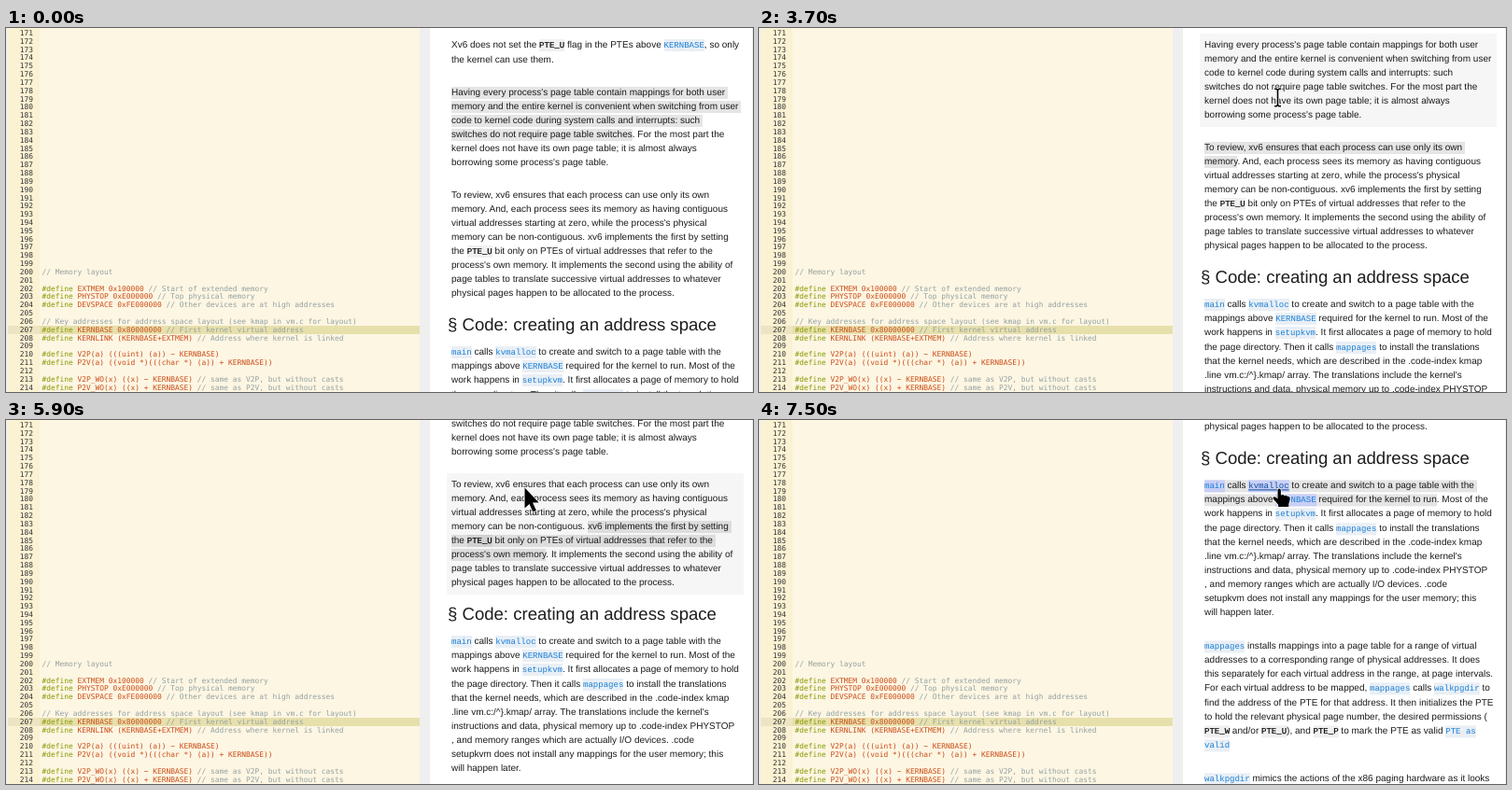
Recreate the animation shown at these times as an HTML page. Size 800 px wide and 390 px high, loop 8 s.

```html
<!DOCTYPE html>
<html lang="en">
<head>
<meta charset="utf-8">
<title>Code and commentary</title>
<style>
  html, body { margin: 0; width: 100%; height: 100%; overflow: hidden; background: #fff; }
  #stage { position: relative; width: 800px; height: 390px; overflow: hidden; background: #fff;
    text-rendering: geometricPrecision; font-kerning: none; font-variant-ligatures: none; }
  #stage div { position: absolute; white-space: pre; }

  #editor { left: 2px; top: 0; width: 441px; height: 390px; overflow: hidden; background: #fdf6e3;
    font: 7.9px/9px "DejaVu Sans Mono", monospace; color: #cb4b16; }
  #gutter { left: 0; top: 0; width: 34px; height: 390px; background: #fbf1d3; }
  #active { left: 0; width: 407px; height: 8.8px; background: #e7e0ac; border-left: 34px solid #ede5c1; }
  .num { left: 0; width: 27px; text-align: right; color: #333; }
  .code { left: 36.4px; }
  .code b { font-weight: 400; color: #859900; }
  .code i { font-style: normal; color: #93a1a1; }

  #split { left: 443px; top: 0; width: 11px; height: 390px; background: #efefef; }
  .edge { top: 0; height: 390px; background: #efefef; }

  #view { left: 454px; top: 0; width: 345px; height: 390px; overflow: hidden; }
  #doc { left: -454px; top: 0; color: #1c1c1c; font: 10.02px/15px "Liberation Sans", Arial, sans-serif; }
  #doc h2 { position: absolute; left: 473px; top: 305.5px; margin: 0; font: 400 18.57px/24px "Liberation Sans", Arial, sans-serif; }
  .para { left: 472px; width: 318px; }
  .para.hover { background: #f6f6f6; }
  .line { left: 5px; height: 15px; }
  mark { color: inherit; background: none; padding: 1px 0; }
  mark.on { background: rgba(0, 0, 0, .1); }
  code { font: 9.02px/0 "Liberation Mono", "Courier New", monospace; padding: 1px 0;
    color: #000; background: rgba(0, 0, 0, .06); -webkit-text-stroke: .2px; }
  code.link { color: #1a7fd6; background: #e9eff5; -webkit-text-stroke: 0; }
  mark.on code.link { background: #c9cff6; }
  code.link.over { color: #0b4f9c; text-decoration: underline; }

  #pointer { position: absolute; left: 0; top: 0; overflow: visible; }
  #pointer path { fill: #000; stroke: #fff; stroke-width: 1.4; paint-order: stroke; stroke-linejoin: round; }
</style>
</head>
<body>
<div id="stage">
  <div class="edge" style="left:0;width:2px"></div>
  <div id="editor"><div id="gutter"></div><div id="active"></div></div>
  <div id="split"></div>
  <div id="view"><div id="doc"><h2>§ Code: creating an address space</h2></div></div>
  <div class="edge" style="left:799px;width:1px"></div>
  <svg id="pointer" width="1" height="1">
    <path id="beam" d="M-3.5-10H-1L0-9L1-10H3.5V-8.4H1.5L.8-7.5V7.5L1.5 8.4H3.5V10H1L0 9L-1 10H-3.5V8.4H-1.5L-.8 7.5V-7.5L-1.5-8.4H-3.5Z"/>
    <path id="arrow" d="M0 0V22L5 17.4L8.8 26L12.4 24.4L8.6 16H15.2Z"/>
    <path id="hand" d="M0 1.5Q.2 0 1.6 0T3.4 1.5V7L5.8 6.6L7.2 7.4L9.2 7.2L10.4 8.2L12.2 8.6Q13.4 9.5 13.2 11.5L11.8 16.5V19.5H.6V17.2L-4.6 11.2Q-5.6 9.2-4 8.8Q-2 8.8 0 11Z"/>
  </svg>
</div>
<script>
const $ = id => document.getElementById(id);
const add = (parent, cls, html, top) => {
  const el = document.createElement('div');
  el.className = cls;
  el.innerHTML = html;
  el.style.top = top + 'px';
  return parent.appendChild(el);
};

// Editor
const FIRST = 171, LAST = 214, ROW = 8.826;
const rowTop = n => 1 + (n - FIRST) * ROW;
const source = {
  200: '// Memory layout',
  202: '#define EXTMEM 0x100000 // Start of extended memory',
  203: '#define PHYSTOP 0xE000000 // Top physical memory',
  204: '#define DEVSPACE 0xFE000000 // Other devices are at high addresses',
  206: '// Key addresses for address space layout (see kmap in vm.c for layout)',
  207: '#define KERNBASE 0x80000000 // First kernel virtual address',
  208: '#define KERNLINK (KERNBASE+EXTMEM) // Address where kernel is linked',
  210: '#define V2P(a) (((uint) (a)) − KERNBASE)',
  211: '#define P2V(a) ((void *)(((char *) (a)) + KERNBASE))',
  213: '#define V2P_WO(x) ((x) − KERNBASE) // same as V2P, but without casts',
  214: '#define P2V_WO(x) ((x) + KERNBASE) // same as P2V, but without casts'
};
$('active').style.top = rowTop(207) + 'px';
for (let n = FIRST; n <= LAST; n++) {
  add($('editor'), 'num', n, rowTop(n));
  if (source[n]) add($('editor'), 'code',
    source[n].replace(/\/\/.*/, '<i>$&</i>').replace('#define', '<b>$&</b>'), rowTop(n));
}

// Commentary: [sentence], `link`, ~plain code~; each entry starts at the centre of its first line
const text = [
  [17.8, `Xv6 does not set the ~PTE_U~ flag in the PTEs above \`KERNBASE\`, so only
the kernel can use them.`],
  [68.5, `[Having every process's page table contain mappings for both user
memory and the entire kernel is convenient when switching from user
code to kernel code during system calls and interrupts: such
switches do not require page table switches]. [For the most part the
kernel does not have its own page table; it is almost always
borrowing some process's page table. ]`],
  [178.5, `[To review, xv6 ensures that each process can use only its own
memory]. [And, each process sees its memory as having contiguous
virtual addresses starting at zero, while the process's physical
memory can be non-contiguous]. [xv6 implements the first by setting
the ~PTE_U~ bit only on PTEs of virtual addresses that refer to the
process's own memory]. [It implements the second using the ability of
page tables to translate successive virtual addresses to whatever
physical pages happen to be allocated to the process. ]`],
  [346.3, `[\`main\` calls \`kvmalloc\` to create and switch to a page table with the
mappings above \`KERNBASE\` required for the kernel to run]. Most of the
work happens in \`setupkvm\`. It first allocates a page of memory to hold
the page directory. Then it calls \`mappages\` to install the translations
that the kernel needs, which are described in the .code-index kmap
.line vm.c:/^}.kmap/ array. The translations include the kernel's
instructions and data, physical memory up to .code-index PHYSTOP
, and memory ranges which are actually I/O devices. .code
setupkvm does not install any mappings for the user memory; this
will happen later.`],
  [518.6, `\`mappages\` installs mappings into a page table for a range of virtual
addresses to a corresponding range of physical addresses. It does
this separately for each virtual address in the range, at page intervals.
For each virtual address to be mapped, \`mappages\` calls \`walkpgdir\` to
find the address of the PTE for that address. It then initializes the PTE
to hold the relevant physical page number, the desired permissions (
~PTE_W~ and/or ~PTE_U~), and ~PTE_P~ to mark the PTE as valid \`PTE as\`
\`valid\``],
  [660.5, '`walkpgdir` mimics the actions of the x86 paging hardware as it looks']
];

let sentence = -1, inside = false;
function markup(line) {
  const open = () => `<mark data-s="${sentence}">`;
  let html = inside ? open() : '';
  for (const part of line.split(/([\[\]]|`[^`]+`|~[^~]+~)/)) {
    if (part === '[') { sentence++; inside = true; html += open(); }
    else if (part === ']') { inside = false; html += '</mark>'; }
    else if (part[0] === '`') html += `<code class="link">${part.slice(1, -1)}</code>`;
    else if (part[0] === '~') html += `<code>${part.slice(1, -1)}</code>`;
    else html += part;
  }
  return html + (inside ? ' </mark>' : '');
}

const paras = text.map(([centre, body]) => {
  const para = add($('doc'), 'para', '', centre - 12);
  let y = 5.4;
  for (const line of body.split('\n')) {
    add(para, 'line', markup(line), y);
    y += /[`~]/.test(line) ? 15.4 : 15;   // code makes a line slightly taller
  }
  para.style.height = y + 4.6 + 'px';
  return para;
});
const marks = [...document.querySelectorAll('mark')];
const hot = [...document.querySelectorAll('.link')].find(el => el.textContent === 'kvmalloc');

// Each step lists only what changes at that time
const steps = [
  { t: 0, scroll: 0, read: 0, hover: -1, cursor: '', x: 0, y: 0 },
  { t: 800, hover: 2, cursor: 'beam', x: 640, y: 278 },
  { t: 900, hover: 1, x: 601, y: 120 },
  { t: 1100, x: 582, y: 103 },
  { t: 1200, x: 558, y: 84 },
  { t: 1300, x: 548, y: 76 },
  { t: 1400, x: 555.5, y: 74.5 },
  { t: 2900, read: 1 },
  { t: 3700, read: 2, scroll: 51 },
  { t: 3800, scroll: 85 },
  { t: 3900, scroll: 104 },
  { t: 4000, scroll: 110, hover: 2, cursor: 'arrow', x: 555.5, y: 72.5 },
  { t: 4800, read: 3 },
  { t: 5900, read: 4 },
  { t: 6600, read: 5 },
  { t: 7300, read: 6, scroll: 195 },
  { t: 7400, scroll: 258 },
  { t: 7500, scroll: 276.6, hover: -1, cursor: 'hand', x: 555.5, y: 73.5 }
];
steps.forEach((s, i) => { steps[i] = { ...steps[i - 1], ...s }; });

let shown;
function draw(now) {
  const t = now % 8000;
  const s = steps.filter(step => step.t <= t).pop();
  if (s !== shown) {
    shown = s;
    $('doc').style.transform = `translateY(${-s.scroll}px)`;
    paras.forEach((p, i) => p.classList.toggle('hover', i === s.hover));
    marks.forEach(m => m.classList.toggle('on', +m.dataset.s === s.read));
    hot.classList.toggle('over', s.cursor === 'hand');
    for (const id of ['beam', 'arrow', 'hand']) $(id).style.display = id === s.cursor ? '' : 'none';
    $('pointer').style.transform = `translate(${s.x}px, ${s.y}px)`;
  }
  requestAnimationFrame(draw);
}
draw(0);
</script>
</body>
</html>
```
